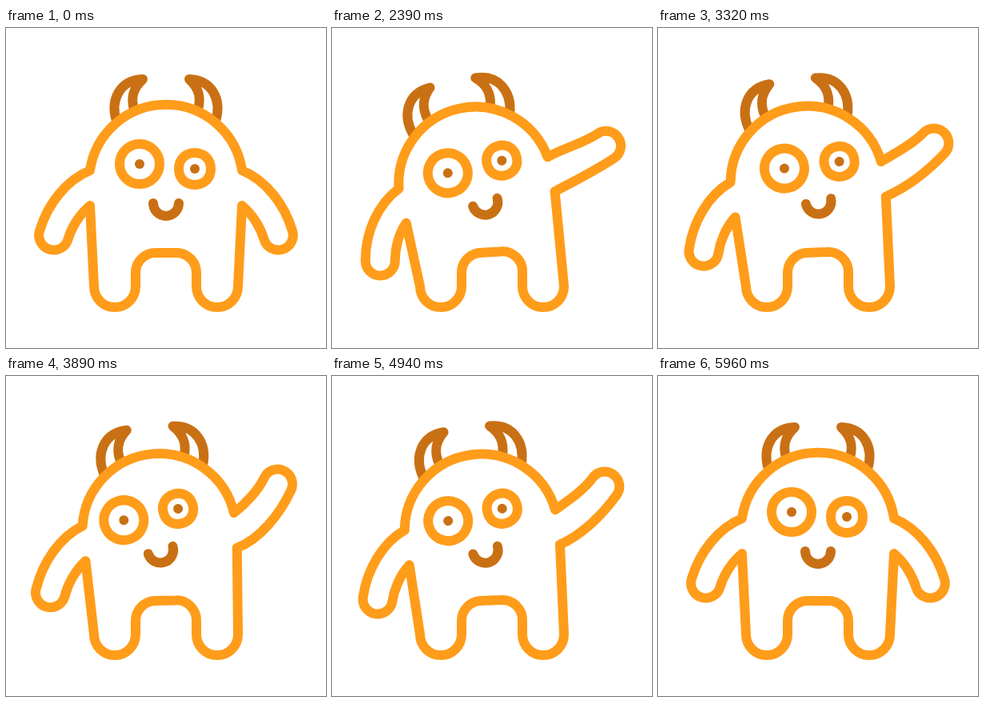
Animation of 400x400 px, one loop 5990 ms. Source, as an HTML page:

```html
<!DOCTYPE html>
<html lang="en">
<head>
<meta charset="utf-8">
<title>Waving monster</title>
<style>
  html, body { margin: 0; width: 100%; height: 100%; overflow: hidden; background: #fff; }
  svg { display: block; width: 100vw; height: 100vh; }
  .line { fill: none; stroke: #ff9c1a; stroke-width: 12; stroke-linecap: round; stroke-linejoin: round; }
  .dark { stroke: #c97014; }
  .solid { fill: #fff; }
  .pupil { fill: #c97014; }
</style>
</head>
<body>
<svg viewBox="0 0 400 400">
  <g id="horns">
    <path id="horn" class="line dark" d="M138 116C130 90 142 65 171 64C158 76 156 88 160 102"/>
    <use href="#horn" transform="translate(400 0) scale(-1 1)"/>
  </g>
  <path id="body" class="line solid"/>
  <g id="face">
    <circle class="line" cx="-34.5" cy="-3" r="25"/>
    <circle class="pupil" cx="-34.5" cy="-3" r="6"/>
    <g transform="translate(34.5 3)">
      <path id="eye" class="line"/>
      <circle id="pupil" class="pupil"/>
    </g>
    <path class="line dark" d="M-17.5 46A16 16 0 0 0 14.5 46"/>
  </g>
</svg>
<script>
const LOOP = 5990, RISE = 2000, SWAY = 2420, PERIOD = 1140, STOP = SWAY + 2.5 * PERIOD;

const $ = id => document.getElementById(id);
const rad = deg => deg * Math.PI / 180;
const clamp = (v, lo, hi) => Math.min(hi, Math.max(lo, v));
const mix = (a, b, k) => a + (b - a) * k;
const ease = (t, from, to) => (1 - Math.cos(Math.PI * clamp((t - from) / (to - from), 0, 1))) / 2;
const fmt = points => points.map(p => p.map(v => v.toFixed(2)).join(' ')).join(' ');

// Rest, swing between "far" and "near" two and a half times, return to rest.
function swing(t, rest, far, near, lag = 0, leave = STOP, end = 5930) {
  const phase = clamp(t - lag, SWAY, STOP) - SWAY;
  const sway = (1 + Math.cos(2 * Math.PI * phase / PERIOD)) / 2;
  const active = ease(t, RISE, 2400) * (1 - ease(t, leave, end));
  return mix(rest, mix(near, far, sway), active);
}

// Arm on one side (1 right, -1 left): two edges that meet in a round hand.
function arm(side, place, tilt, angle) {
  const turn = side * tilt;
  const step = (p, deg, len) =>
    [p[0] + side * len * Math.cos(rad(deg)), p[1] - len * Math.sin(rad(deg))];
  const shoulder = place(side * 95, 0), pit = place(side * 95, 44);
  const root = [mix(shoulder[0], pit[0], .5), mix(shoulder[1], pit[1], .5)];
  const hand = step(root, angle + turn, 76.5 + .04 * angle);
  const axis = 1.4 * angle + turn;
  const top = step(hand, axis + 90, 18.5), low = step(hand, axis - 90, 18.5);
  return {
    upper: [shoulder, step(shoulder, .58 * angle + 8 + turn, 25 - .13 * angle),
            step(top, axis, .2 * angle - 25), top],
    lower: [low, step(low, axis, -25 - .2 * angle),
            step(pit, Math.min(.85 * angle + 5, 16) + turn, 25 + .13 * angle), pit]
  };
}

function bodyPath(lean, place, wave, idle) {
  const right = arm(1, place, 12 * lean, wave), left = arm(-1, place, 12 * lean, idle);
  const curve = ([a, ...rest]) => fmt([a]) + 'C' + fmt(rest);
  const hand = 'A18.5 18.5 0 0 1 ';
  return 'M' + fmt([left.upper[0]]) +
    'A96 96 0 0 1 ' + curve(right.upper) + hand + curve(right.lower) +
    'L290 323A26 26 0 0 1 238 323V306' +
    `A25 25 0 0 0 ${213 - 3 * lean} ${281 - 1.5 * lean}L${187 - 3 * lean} 281` +
    'A25 25 0 0 0 162 306V323A26 26 0 0 1 110 323' +
    'L' + curve(left.lower.reverse()) + hand + curve(left.upper.reverse()) + 'Z';
}

// Circle whose upper half flattens into a lid.
function eyePath(r, wink) {
  const lid = 5 * wink, up = lid - r * 4 / 3 * (1 - wink), down = lid + (r - lid) * 4 / 3;
  return `M${-r} ${lid}C${-r} ${up} ${r} ${up} ${r} ${lid}C${r} ${down} ${-r} ${down} ${-r} ${lid}Z`;
}

function draw(t) {
  const lean = swing(t, 0, 1, .06);
  const wave = swing(t, -52.5, 15.5, 55, -25, 5250, 5725);
  const idle = swing(t, -52.5, -56, -47.5);
  const cx = 200 - 23.5 * lean, cy = 178 + 3 * lean;
  const c = Math.cos(rad(12 * lean)), s = Math.sin(rad(12 * lean));
  const place = (x, y) => [cx + x * c + y * s, cy - x * s + y * c];

  $('horns').setAttribute('transform',
    `translate(${cx - 2 * lean} ${cy - lean}) rotate(${-12 * lean}) translate(-200 -178)`);
  $('body').setAttribute('d', bodyPath(lean, place, wave, idle));

  // The face trails behind the body.
  const face = (far, near) => swing(t, 0, far, near, 180);
  const turn = face(-18, -11);
  $('face').setAttribute('transform',
    `translate(${201.5 + face(-23, -6.5)} ${173 + face(.5, -2.2)}) rotate(${turn})`);

  const wink = ease(t, 5030, 5200) - ease(t, 5400, 5760);
  $('eye').setAttribute('d', eyePath(20 - Math.min(1, -turn / 11), wink));
  $('pupil').setAttribute('r', 6 * Math.max(0, 1 - 1.6 * wink));
}

const start = performance.now();
function frame() {
  draw((performance.now() - start) % LOOP);
  requestAnimationFrame(frame);
}
frame();
</script>
</body>
</html>
```
